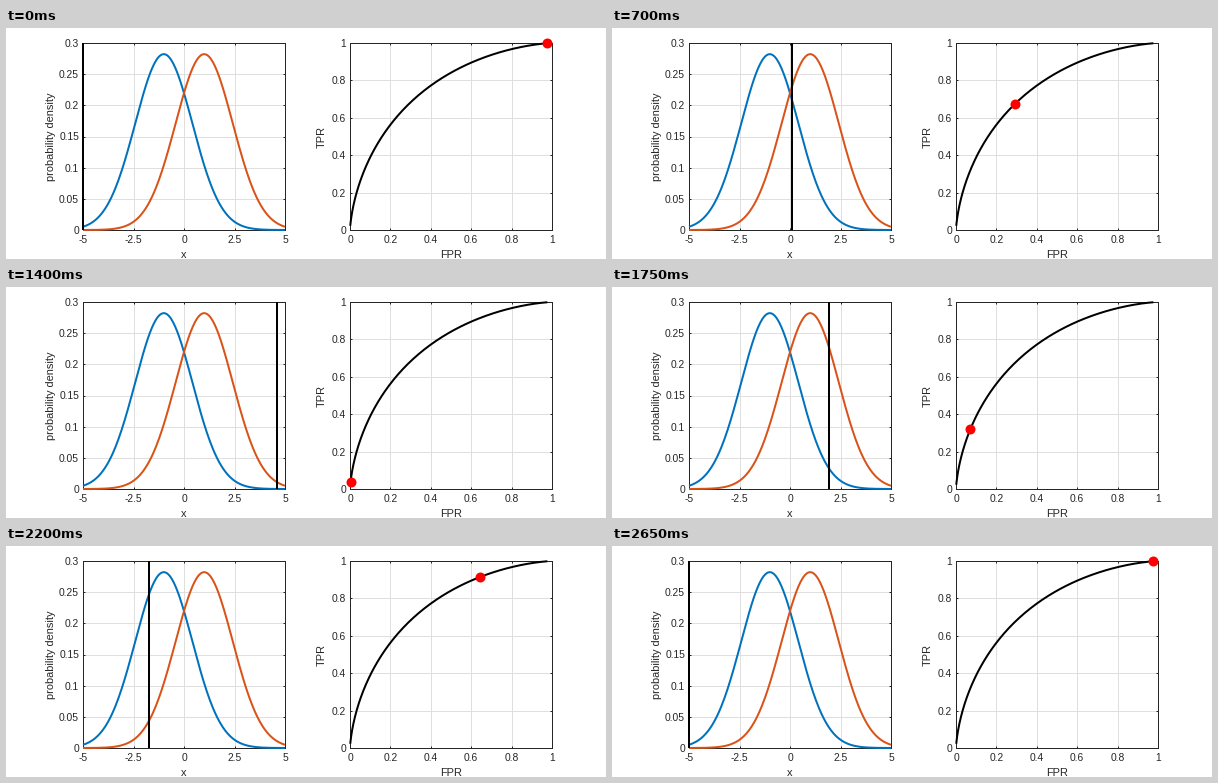
A matplotlib script for the animation above (2900 ms loop, 600x231 px).

```python
import math

import matplotlib.pyplot as plt
import numpy as np
from matplotlib.animation import FuncAnimation

W, H, DPI = 600, 231, 100
PX = 72 / DPI  # points per pixel
INK = "#262626"
BLUE, ORANGE = "#0072BD", "#D95319"

FRAMES, INTERVAL = 58, 50
LAST_STEP = 49  # the threshold takes 50 positions from -5 to 5

plt.rcParams.update({
    "font.family": "Liberation Sans",
    "axes.unicode_minus": False,
})


def density(x, mean, var=2):
    return np.exp(-(x - mean) ** 2 / (2 * var)) / math.sqrt(2 * math.pi * var)


def rate(t, mean, scale=2):
    """Share of a class lying above the threshold t."""
    return 0.5 * math.erfc((t - mean) / (scale * math.sqrt(2)))


def make_axes(left, xticks, yticks, xlabel, ylabel, label_x):
    ax = fig.add_axes([left / W, 1 - 202 / H, 202 / W, 187 / H])
    ax.set_xlim(xticks[0], xticks[-1])
    ax.set_ylim(yticks[0], yticks[-1])
    ax.set_xticks(xticks, [f"{v:g}" for v in xticks])
    ax.set_yticks(yticks, [f"{v:g}" for v in yticks])
    ax.set_axisbelow(True)
    ax.grid(color="#dfdfdf", linewidth=PX)
    ax.tick_params(direction="in", top=True, right=True, length=2 * PX,
                   width=PX, color=INK, labelcolor=INK, labelsize=10.2 * PX)
    ax.tick_params(axis="x", pad=5 * PX)
    ax.tick_params(axis="y", pad=4 * PX)
    for spine in ax.spines.values():
        spine.set(color=INK, linewidth=PX, zorder=1)
    style = dict(ha="center", va="center", color=INK, fontsize=11 * PX)
    fig.text((left + 101) / W, 1 - 227 / H, xlabel, **style)
    fig.text(label_x / W, 1 - 108.5 / H, ylabel, rotation=90, **style)
    return ax


fig = plt.figure(figsize=(W / DPI, H / DPI), dpi=DPI, facecolor="white")
pdf_ax = make_axes(77, np.linspace(-5, 5, 5), np.linspace(0, 0.3, 7),
                   "x", "probability density", 45)
roc_ax = make_axes(344, np.linspace(0, 1, 6), np.linspace(0, 1, 6),
                   "FPR", "TPR", 316)

xs = np.linspace(-5, 5, 200)
curve = dict(linewidth=2 * PX, clip_on=False, solid_capstyle="butt")
pdf_ax.plot(xs, density(xs, -1), color=BLUE, **curve)
pdf_ax.plot(xs, density(xs, 1), color=ORANGE, **curve)
roc_ax.plot([rate(t, -1) for t in xs], [rate(t, 1) for t in xs],
            color="black", **curve)

bar, = pdf_ax.plot([-5, -5], [0, 0.3], color="black", zorder=4, **curve)
dot, = roc_ax.plot([], [], "o", color="red", markersize=10 * PX,
                   markeredgewidth=0, clip_on=False, zorder=5)


def threshold(i):
    """Sweep up and back down in whole steps, then rest at the left end."""
    step = round(np.interp(i, [0, 8, 20, 28, 35, 44, 53],
                           [0, 14, 36, 51, 64, 82, 98]))
    return -5 + 10 * (LAST_STEP - abs(LAST_STEP - step)) / LAST_STEP


def update(i):
    t = threshold(i)
    bar.set_xdata([t, t])
    dot.set_data([rate(t, -1)], [rate(t, 1)])
    return bar, dot


anim = FuncAnimation(fig, update, frames=FRAMES, interval=INTERVAL,
                     repeat=True, repeat_delay=0)
plt.show()
```
